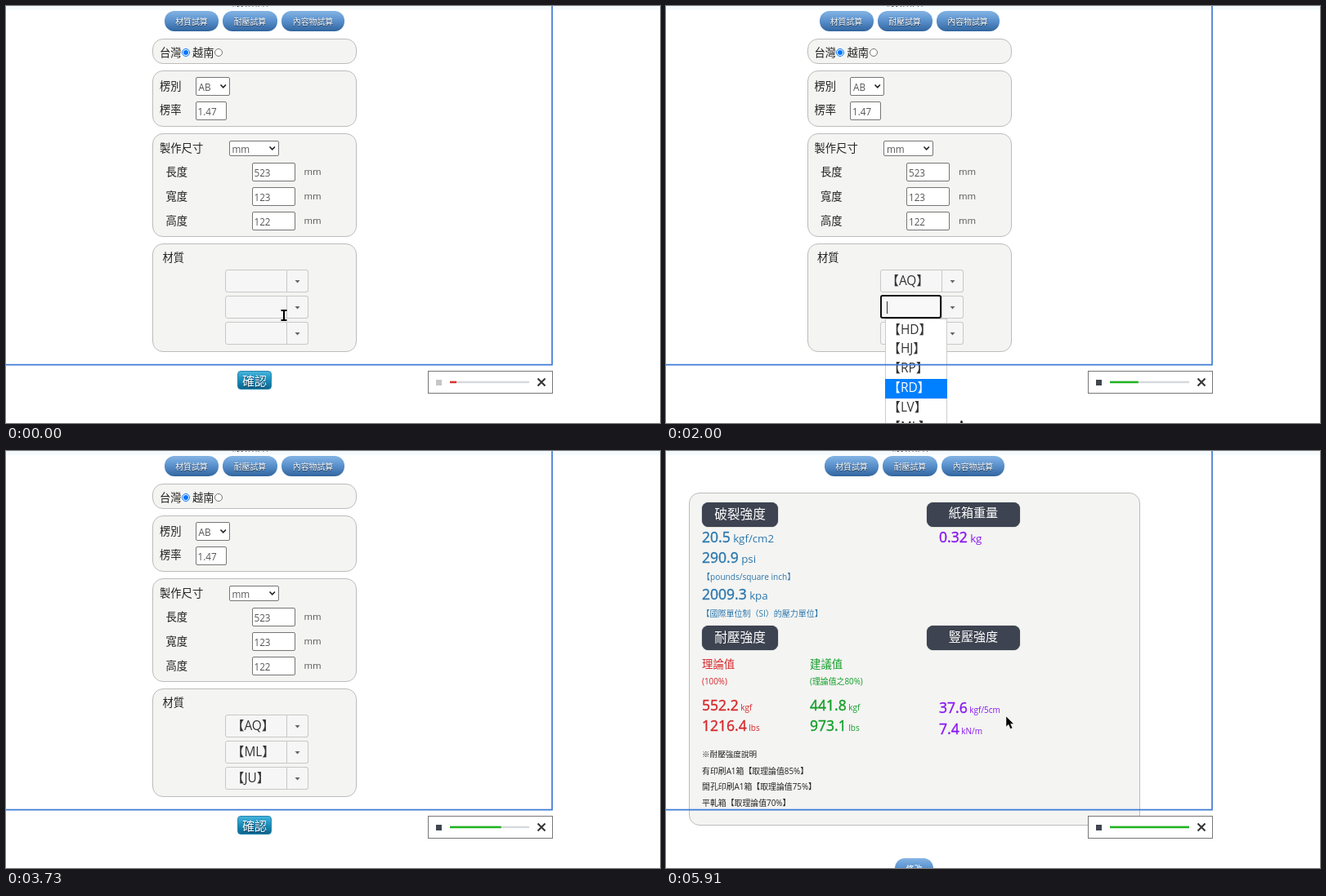
An HTML page for the animation above (6000 ms loop, 800 by 511 pixels).

```html
<!DOCTYPE html>
<html lang="zh-Hant">
<head>
<meta charset="utf-8">
<title>紙箱試算</title>
<style>
html, body { margin: 0; width: 100%; height: 100%; overflow: hidden; background: #fff; }
#stage { position: relative; width: 800px; height: 511px; overflow: hidden;
  font-family: "Open Sans", "Noto Sans CJK TC", "Noto Sans CJK JP", "Noto Sans CJK", sans-serif; }
#stage div { position: absolute; box-sizing: border-box; }
#stage .layer { left: 0; top: 0; width: 800px; height: 511px; }
.text { white-space: pre; line-height: 24px; height: 24px; }
.center { text-align: center; }
.panel { background: #f4f4f2; border: 1px solid #bcbcbc; border-radius: 13px; }
.pill { background: linear-gradient(#84b4e4, #5c93cf 45%, #31659f); border-radius: 12px; }
.field { background: #fff; border: 1px solid #767676; border-radius: 2px; }
.combo { background: #f6f6f6; border: 1px solid #c8c8c8; border-radius: 3px; }
.focus { background: #f8f8f8; border: 2px solid #111; border-radius: 3px; }
.head { background: #3d4350; border-radius: 8px; box-shadow: 0 0 1px #3d4350; }
.list { background: #fff; border: 1px solid #ccc; }
.radio { border: 1px solid #767676; border-radius: 50%; background: #fff; }
.confirm { border-radius: 4px; border: 1px solid #2a86ab; }
.num { -webkit-text-stroke: .4px currentColor; }
svg { position: absolute; left: 0; top: 0; }
</style>
</head>
<body>
<div id="stage"></div>
<script>
const LOOP = 6000, STEPS = 66, STEP = LOOP / STEPS;
const stage = document.getElementById('stage');

function box(parent, cls, x, y, w, h, css = '') {
  const d = document.createElement('div');
  d.className = cls;
  d.style.cssText = `left:${x}px;top:${y}px;width:${w}px;height:${h}px;${css}`;
  parent.appendChild(d);
  return d;
}

// cy is the vertical middle of the line
function text(parent, x, cy, size, str, color = '#222', css = '') {
  const d = document.createElement('div');
  d.className = 'text';
  d.style.cssText = `left:${x}px;top:${cy - 12}px;font-size:${size}px;color:${color};${css}`;
  d.textContent = str;
  parent.appendChild(d);
  return d;
}

function label(parent, x, cy, w, size, str, css = '') {
  const d = text(parent, x, cy, size, str, '#fff', `width:${w}px;${css}`);
  d.classList.add('center');
  return d;
}

function svg(parent, markup) {
  parent.insertAdjacentHTML('beforeend',
    `<svg width="800" height="511" viewBox="0 0 800 511">${markup}</svg>`);
  return parent.lastElementChild;
}

const layer = (parent = stage) => box(parent, 'layer', 0, 0, 800, 511);
const show = (node, on) => { node.style.display = on ? '' : 'none'; };

box(stage, '', 0, 0, 800, 5, 'background:#f5fafd');
const page = layer(), form = layer(page), result = layer(page);

// Header shared by both views
text(page, 277, -6, 13.3, '紙箱估值');
[[194, 66, '材質試算'], [265, 67, '耐壓試算'], [337, 77, '內容物試算']].forEach(([x, w, s]) => {
  box(page, 'pill', x, 6, w, 25);
  label(page, x, 19, w, 9.9, s, 'font-weight:500;text-shadow:0 1px 1px #234');
});

// Input form
const INK = '#555';
[[40, 31], [79, 69], [156, 127], [291, 133]].forEach(([y, h]) => box(form, 'panel', 179, y, 250, h));
[[188, 57, '台灣'], [228, 57, '越南'], [188, 98, '楞別'], [188, 127, '楞率'], [188, 174, '製作尺寸'],
 [195.5, 203, '長度'], [195.5, 233, '寬度'], [195.5, 263, '高度'], [191.5, 308, '材質']]
  .forEach(([x, y, s]) => text(form, x, y, 13.3, s));

box(form, 'radio', 214.5, 52, 10, 10, 'border-color:#0075ff');
box(form, 'radio', 216.5, 54, 6, 6, 'border:0;background:#0075ff');
box(form, 'radio', 255, 52, 10, 10);

function field(x, y, w, h, str, pad) {
  const f = box(form, 'field', x, y, w, h);
  text(f, pad, h / 2 - 1, 11.7, str, INK);
  return f;
}
function select(x, y, w, h, str) {
  svg(field(x, y, w, h, str, 3),
    `<path d="M${w - 12.5} ${h / 2 - 3}l3.2 3.4 3.2-3.4" fill="none" stroke="#222" stroke-width="1.6"/>`);
}
select(231.5, 87, 42, 23, 'AB');
field(231.5, 117, 38, 23, '1.47', 2);
select(272.5, 165, 61, 19, 'mm');
['523', '123', '122'].forEach((s, k) => {
  field(300.5, 192 + k * 30.2, 53, 23, s, 2);
  text(form, 364.5, 203 + k * 30.2, 11.4, 'mm', INK);
});

// Material pickers
const PAPER = ['5J', '8K', 'AP', 'AQ', 'AV', 'BK', 'JR', 'JU'];
const CORE = ['HD', 'HJ', 'RP', 'RD', 'LV', 'ML'];
const ITEM = 23.9, FONT = 15.4;
const wrap = s => `【${s}】`;

const rows = [
  { items: PAPER, value: 'AQ', open: 9, pick: 15, listX: 262 },
  { items: CORE, value: 'ML', open: 18, pick: 26, listX: 268 },
  { items: PAPER, value: 'JU', open: 30, pick: 39, listX: 262 }
];
const confirm = box(form, 'confirm', 283, 447, 42, 23);
label(form, 283, 459, 42, 15, '確認', 'font-weight:500;text-shadow:0 1px 1px #035');

rows.forEach((r, k) => {
  const y = 323 + k * 32;
  box(form, 'combo', 268, y, 102, 28);
  r.button = box(form, 'combo', 343, y, 27, 28, 'border-radius:0 3px 3px 0');
  svg(r.button, '<path d="M9.5 12h6l-3 3.5z" fill="#666"/>');
  r.text = text(form, 276, y + 13.5, FONT, wrap(r.value), '#333');
  r.focus = box(form, 'focus', 268, y - 1, 75, 29);
  box(r.focus, '', 6.5, 6, 1, 15, 'background:#333');
  r.list = box(stage, 'list', r.listX, y + 28, 76, r.items.length * ITEM + 3);
  r.cells = r.items.map((s, n) => {
    const cell = box(r.list, '', -1, 1 + n * ITEM, 76, 24.5);
    text(cell, 3.5, 11.5, FONT, wrap(s), 'inherit');
    return cell;
  });
});

// Result view
const BLUE = '#2b77ad', RED = '#d5282c', GREEN = '#119d27', PURPLE = '#8916f2';
box(result, 'panel', 28, 51, 552, 408);
[[44, 63, 93, 15.7, '破裂強度', 77], [319, 63, 114, 15.1, '紙箱重量', 75],
 [44, 214, 93, 15.7, '耐壓強度', 228], [319, 214, 114, 15.1, '豎壓強度', 227]]
  .forEach(([x, y, w, size, s, cy]) => {
    box(result, 'head', x, y, w, 30);
    label(result, x, cy, w, size, s);
  });

[[44, 154, 10.1, '【pounds/square inch】', BLUE], [43.5, 199, 10, '【國際單位制（SI）的壓力單位】', BLUE],
 [44, 261, 13.4, '理論值', RED], [44, 282, 9.9, '(100%)', RED],
 [176, 261, 13.4, '建議值', GREEN], [176, 282, 9.9, '(理論值之80%)', GREEN],
 [44, 392, 9.9, '有印刷A1箱【取理論值85%】'], [44, 411, 9.9, '開孔印刷A1箱【取理論值75%】'],
 [44, 430.5, 9.9, '平軋箱【取理論值70%】']]
  .forEach(a => text(result, ...a));
text(result, 44, 372, 9.6, '※耐壓強度說明', '#222', 'font-weight:500');

const counters = [
  [44, 105, 20.5, 'kgf/cm2', 13.3, BLUE], [44, 130, 290.9, 'psi', 13.3, BLUE],
  [44, 175, 2009.3, 'kpa', 13.3, BLUE], [334, 105, 0.32, 'kg', 13.3, PURPLE, 2],
  [44, 311, 552.2, 'kgf', 10, RED], [44, 336, 1216.4, 'lbs', 10, RED],
  [176, 311, 441.8, 'kgf', 10, GREEN], [176, 336, 973.1, 'lbs', 10, GREEN],
  [334, 314, 37.6, 'kgf/5cm', 10, PURPLE], [334, 340, 7.4, 'kN/m', 10, PURPLE]
].map(([x, cy, end, unit, size, color, digits = 1]) => {
  const line = text(result, x, cy, 17.5, '', color);
  const num = document.createElement('span'), tail = document.createElement('span');
  num.className = 'num';
  tail.style.fontSize = size + 'px';
  tail.textContent = ' ' + unit;
  line.append(num, tail);
  return f => { num.textContent = (end * f).toFixed(digits); };
});
box(result, 'pill', 280, 499, 47, 26);
label(result, 280, 512, 47, 10, '修改', 'font-weight:500');

// Capture frame and player bar
svg(stage, '<path d="M0 439.600H668V0" fill="none" stroke="#3f7bd6" stroke-width="1.7"/>');
const player = box(stage, '', 516, 447, 153, 28, 'background:#fff;border:1px solid #777');
const stop = box(player, '', 9, 10, 7, 7);
const bar = svg(player, `
  <rect x="26" y="11.700" width="97" height="2.500" fill="#d6dade"/>
  <path d="M133.500 8.500l9 9m0-9l-9 9" stroke="#333" stroke-width="2"/>
  <rect x="26" y="11.700" height="2.500"/>`).lastElementChild;

// Pointers, drawn around their hot spot
const cursors = svg(stage, `
  <g><path d="M-3.500-6h2.500l1 1 1-1h2.500M0-5V5M-3.500 6h2.500l1-1 1 1h2.500" fill="none" stroke="#000" stroke-width="2"/></g>
  <g><path d="M-1 .5Q1-1 2 1V6L8 7.500Q10 8 10 10V13L8 18H-1L-5 11Q-5 8.500-2.500 9.500L-1 11Z" fill="#111" stroke="#fff" stroke-width=".5"/></g>
  <g><path d="M0 0V13L3 10.200L5.200 15.500L7.800 14.400L5.600 9.500H9.500Z" fill="#000" stroke="#fff" stroke-width=".5"/></g>`).children;
const BEAM = 0, HAND = 1, ARROW = 2;

// step, x, y, pointer
const PATH = [
  [0, 340, 379, BEAM], [3, 331, 345, BEAM], [7, 338, 344, BEAM], [8, 354, 338, HAND],
  [9, 354, 345, HAND], [10, 371, 396, HAND], [12, 320, 432, HAND], [15, 302, 432, HAND],
  [17, 354, 368, HAND], [18, 354, 370, HAND], [21, 325, 468, HAND], [22, 361, 508, HAND],
  [24, 325, 514, HAND], [26, 325, 514, HAND], [29, 354, 400, HAND], [31, 354, 402, HAND],
  [33, 330, 530, HAND], [39, 320, 560, HAND], [42, 330, 490, ARROW], [44, 308, 456, HAND],
  [47, 306, 457, HAND], [48, 345, 430, ARROW], [50, 405, 383, ARROW], [56, 417, 325, ARROW],
  [65, 416, 325, ARROW]
];
// from step: row, highlighted item
const HOVER = [[12, 0, 3], [15], [20, 1, 2], [21, 1, 3], [23, 1, 5], [26], [37, 2, 7], [39]];
const RESULT_AT = 51, COUNT_LEN = 13.4506;

function pointerAt(i) {
  let k = 0;
  while (k < PATH.length - 2 && PATH[k + 1][0] <= i) k++;
  const a = PATH[k], b = PATH[k + 1], p = (i - a[0]) / (b[0] - a[0]);
  return [a[1] + (b[1] - a[1]) * p, a[2] + (b[2] - a[2]) * p, a[3]];
}

function draw(i) {
  const done = i >= RESULT_AT;
  const isOpen = r => i >= r.open && i < r.pick;
  page.style.left = (rows.some(isOpen) ? -6.5 : 0) + 'px';
  show(form, !done);
  show(result, done);

  const [x, y, kind] = pointerAt(i);
  const [, hotRow, hotItem] = HOVER.filter(h => h[0] <= i).pop() || [];
  rows.forEach((r, k) => {
    const open = isOpen(r);
    show(r.list, open);
    show(r.focus, open);
    show(r.text, i >= r.pick);
    const hover = kind === HAND && x > 343 && x < 368 && Math.abs(y - 337 - k * 32) < 14;
    r.button.style.background = hover || (k === 1 && i === 10) ? '#ececec' : '#f6f6f6';
    r.cells.forEach((c, n) => {
      const hot = k === hotRow && n === hotItem;
      c.style.background = hot ? '#007fff' : 'none';
      c.style.color = hot ? '#fff' : '#333';
    });
  });
  confirm.style.background = i >= 44
    ? 'linear-gradient(#5cc8ea, #2fa5cd 50%, #1580ab)'
    : 'linear-gradient(#45b4dc, #1b8dba 50%, #0b6690)';

  const p = Math.min(1, Math.max(0, (i - RESULT_AT) / COUNT_LEN));
  counters.forEach(set => set(0.5 - Math.cos(Math.PI * p) / 2));

  stop.style.background = i ? '#40464f' : '#c6c6c6';
  bar.setAttribute('fill', i ? '#1fb41f' : '#e03030');
  bar.setAttribute('width', i ? Math.min(97, 1 + 97 * (i + 1) / STEPS) : 8);

  [...cursors].forEach((c, k) => {
    show(c, k === kind);
    c.setAttribute('transform', `translate(${Math.round(x)} ${Math.round(y)})`);
  });
}

let last = -1;
const start = performance.now();
function tick() {
  const t = (performance.now() - start) % LOOP;
  const i = Math.floor((t + 5) / STEP) % STEPS;
  if (i !== last) draw(last = i);
  requestAnimationFrame(tick);
}
draw(0);
requestAnimationFrame(tick);
</script>
</body>
</html>
```
